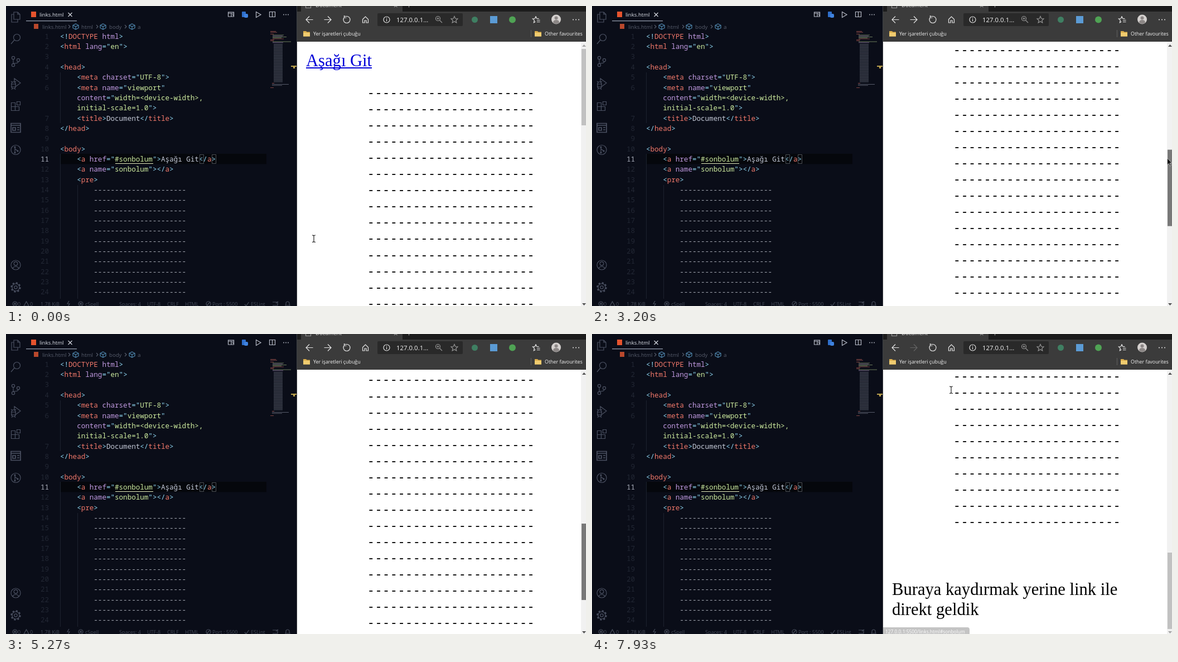
These frames come from a looping animation (1040 px wide and 538 px high, 8000 ms). An HTML page:

```html
<!DOCTYPE html>
<html lang="tr">
<head>
<meta charset="UTF-8">
<title>Links</title>
<style>
html, body { margin: 0; width: 100%; height: 100%; overflow: hidden; background: #0a0d18 }
svg { display: block; width: 1040px; height: 538px }
text { white-space: pre }
.code { font: 12.57px "Noto Sans Mono", monospace }
.ui { font-family: "Open Sans", sans-serif }
.page { font: 30.6px "Liberation Serif", serif }
.dash { font: 22.7px "DejaVu Sans Mono", monospace }
.line { fill: none; stroke-width: 1.2 }
</style>
</head>
<body>
<svg id="stage" viewBox="0 0 1040 538"></svg>
<script>
const LOOP = 8000, FPS = 15, ROWS = 45, MAX_SCROLL = 1097, TRACK = 315;
const esc = s => s.replace(/&/g, '&amp;').replace(/</g, '&lt;');
const text = (cls, x, y, fill, s, size, anchor = 'start') =>
  `<text class="${cls}" x="${x}" y="${y}" fill="${fill}" text-anchor="${anchor}"${size ? ` style="font-size:${size}px"` : ''}>${s}</text>`;
const rect = (x, y, w, h, fill, more = '') => `<rect x="${x}" y="${y}" width="${w}" height="${h}" fill="${fill}" ${more}/>`;
const line = (d, stroke, more = '') => `<path class="line" d="${d}" stroke="${stroke}" ${more}/>`;
const disc = (x, y, r, fill) => `<circle cx="${x}" cy="${y}" r="${r}" fill="${fill}"/>`;
const ring = (x, y, r, stroke, more = '') => `<circle class="line" cx="${x}" cy="${y}" r="${r}" stroke="${stroke}" ${more}/>`;
const repeat = (n, f) => Array.from({ length: n }, (_, i) => f(i)).join('');

// Editor
const COL = 7.54, ROW = 18.34;
const SYNTAX = /((?<==")[^"]+|^initial[^"]+)|(<[\/!]?|>|=|")|((?<=<[\/!]?)\w+)|(\w+(?==")|html(?=>))/g;
const COLORS = ['#cdeb9f', '#8fd6f2', '#f0786a', '#c09ae0'];
const paint = s => s.replace(SYNTAX, (m, ...g) => `<tspan fill="${COLORS[g.findIndex(Boolean)]}">${esc(m)}</tspan>`);
const HYPHENS = '-'.repeat(22);
const code = [
  [1, 0, '<!DOCTYPE html>'], [2, 0, '<html lang="en">'], [3, 0, ''], [4, 0, '<head>'],
  [5, 4, '<meta charset="UTF-8">'], [6, 4, '<meta name="viewport"'],
  ['', 4, 'content="width=<device-width>,'], ['', 4, 'initial-scale=1.0">'],
  [7, 4, '<title>Document</title>'], [8, 0, '</head>'], [9, 0, ''], [10, 0, '<body>'],
  [11, 4, '<a href="#sonbolum">Aşağı Git</a>'], [12, 4, '<a name="sonbolum"></a>'], [13, 4, '<pre>'],
  ...Array.from({ length: 11 }, (_, i) => [14 + i, 8, HYPHENS])
];

function codeLines() {
  return rect(97, 265, 370, 18.5, '#05070c') +
    line('M97.5 119V210M97.5 265V525M128.5 321V525', '#1c212d', 'stroke-width="1"') +
    code.map(([n, col, s], i) => {
      const y = 58.8 + ROW * i;
      return text('code', 77, y, n == 11 ? '#a9adba' : '#222734', n, 0, 'end') +
        text('code', 97 + COL * col, y, s == HYPHENS ? '#a9adb8' : '#c3c8d6', paint(s));
    }).join('') +
    line('M196 282.5H264', '#e4ecc0') +
    line('M347.5 266.5h7v16h-7zM369.5 266.5h7v16h-7z', '#4c5055', 'style="stroke-width:1"');
}

function minimap() {
  const rows = [[0, 10, 2], [0, 12, 2], [0, 6, 2], [4, 20, 0], [4, 18, 3], [4, 25, 0], [4, 16, 0], [4, 20, 2], [0, 7, 2], [0, 6, 2], [4, 33, 0], [4, 19, 3]];
  return rows.map(([x, w, c], i) => rect(474 + x, 45 + i * 1.7 + (i > 1) * 1.5, w, 1, COLORS[c], 'opacity=".5"')).join('') +
    repeat(ROWS, i => rect(480, 68 + i * 1.54, 16, .8, '#737986', 'opacity=".6"')) +
    rect(477, 138, 4, 1, COLORS[2], 'opacity=".5"') + rect(477, 140, 30, 1, '#8b90a0', 'opacity=".6"') +
    rect(477, 142, 18, 1, '#8b90a0', 'opacity=".5"') + rect(474, 146, 6, 1, COLORS[2], 'opacity=".5"') +
    rect(511, 107, 10, 2, '#bda34e') + rect(515, 109, 3, 3, '#bda34e');
}

const cube = (x, y) => line(`M${x} ${y - 5}l5 2.5v5l-5 2.5l-5-2.5v-5zM${x - 5} ${y - 2.5}l5 2.5l5-2.5M${x} ${y}v5`, '#4f86ad');

function editorChrome() {
  const dim = '#4b5162', soft = '#b6bac5', crumb = '#565c6b', low = '#454b59';
  const ui = (x, y, fill, s, size) => text('ui', x, y, fill, s, size);
  const status = [[21, '0'], [43, '0'], [62, '1.78 KiB'], [142, 'cSpell'], [203, 'Spaces: 4'], [253, 'UTF-8'], [289, 'CRLF'], [321, 'HTML'], [370, 'Port : 5500'], [439, 'ESLint']];
  return rect(45, 10, 9, 10, '#e5532d') + ui(60, 19, '#dfe2ea', 'links.html', 9.6) +
    line('M111.5 12l7 7m0-7l-7 7', '#d5d8e0') + rect(36, 26, 91, 1.3, '#8f98a8') +
    rect(50, 32, 8, 9, '#b9482c') + ui(65, 41, crumb, 'links.html', 9.6) +
    ui(135, 41, crumb, 'html', 9.8) + ui(185, 41, crumb, 'body', 9.6) + ui(236, 41, crumb, 'a', 9.8) +
    cube(125, 37) + cube(174, 37) + cube(226, 37) +
    [112, 162, 213].map(x => line(`M${x} 34l3 3l-3 3`, crumb)).join('') +
    // toolbar
    line('M398.5 11h10v8h-10zM398.5 13h10M404 13v6M406 15l3 3', soft) +
    rect(423, 10, 7, 10, '#2f6fca', 'rx="1"') + rect(427, 14, 7, 7, '#3f82df', 'rx="2"') +
    line('M448.5 10.5v10l8.5-5z', soft) + line('M472.5 10.5h10v9h-10zM477.5 10.5v9', soft) +
    [498, 502, 506].map(x => disc(x, 15.5, .9, soft)).join('') +
    // activity bar
    line('M14 11h7l4 4v9h-11zM14 15h-4v14h11v-5M21 11v4h4', dim) +
    ring(19.5, 56.5, 6, dim) + line('M15 61l-6 7', dim) +
    ring(13, 93, 2.6, dim) + ring(13, 106, 2.6, dim) + ring(22, 97, 2.6, dim) + line('M13 96v7.5M22 100q0 3-9 3', dim) +
    line('M15 136v-6l11 8l-8 6M9 140h9M9 145h9M9 135l3 2M18 135l-3 2M10 150l2-3M17 150l-2-3M10 140q0-4 3.5-4t3.5 4v4q0 4-3.5 4t-3.5-4z', dim) +
    line('M9.5 173.5h7v14h-7zM9.5 180.5h14v7h-14M19.5 171.5h6v6h-6z', dim) +
    line('M9 210.5h17v16h-17zM9 214h17M12 218h5v5h-5zM20 218h4M20 222h4', dim, 'style="stroke-width:1.7"') +
    ring(17.5, 258, 8.5, dim) + line('M16 252v12M16 256l5 4', dim) + disc(16, 253, 1.6, dim) + disc(16, 263, 1.6, dim) + disc(21, 260, 1.6, dim) +
    ring(17.5, 464.5, 8.5, dim) + ring(17.5, 462, 3.3, dim) + line('M11.5 470.5q6-7 12 0', dim) +
    ring(17.5, 504.5, 2.7, dim) + ring(17.5, 504.5, 8, dim, 'style="stroke-width:2.4" stroke-dasharray="3.14"') + ring(17.5, 504.5, 6.5, dim) +
    // status bar
    status.map(([x, s]) => ui(x, 537.5, low, s, 9)).join('') +
    [16, 134, 363].map(x => ring(x, 534, 4, low)).join('') +
    line('M14 532l4 4m0-4l-4 4M32 538l4.5-8l4.5 8zM132 532l4 4m0-4l-4 4M360 537l6-6M428 535l2.5 3l5-7M113 529l-3 5h4l-3 5M478 531h9v6h-9M484 533l4-3M501 537h8l-1-2v-3q-3-4-6 0v3z', low);
}

// Browser
function browserChrome() {
  const c = '#e4e4e4', g = '#959595';
  const folder = x => `<path d="M${x} 45h5l1.5 1.5h5.5v8h-12z" fill="#dcae4b"/>` + rect(x, 48, 12, 6.5, '#f0cc70');
  return rect(522, 0, 518, 64, '#3b3b3b') + rect(711, 0, 329, 10, '#1c1c1c') + rect(522, 0, 7, 10, '#1c1c1c') +
    line('M537.5 0v3.5h9v-3.5M696 2l2.5-2.5l3 2.5M722.5 0v2.5', g) + text('ui', 555, 2, c, 'Document', 9.6) +
    line('M550.5 24.5h-12M544 18.5l-6 6l6 6', c) +
    `<g id="forward">${line('M570.5 24.5h12M577 18.5l6 6l-6 6', c)}</g>` +
    line('M606.5 20.5a6 6 0 1 0 4-2h-4M606.5 17v4h4', c) +
    line('M639.5 24l5-5l5 5v6h-3.5v-4h-3v4h-3.5z', c) +
    rect(666, 13, 153, 23, '#292929', 'rx="2"') + ring(682.5, 24.5, 5.5, c) + line('M682.5 23.5v4M682.5 21v1.2', c) +
    text('ui', 700, 28.5, '#f2f2f2', '127.0.0.1...', 11.4) +
    ring(774.5, 22.5, 4, g) + line('M777.5 25.5l4.5 4.5M772.5 22.5h4M774.5 20.5v4', g) +
    line('M804 18.5l1.8 4l4.2.4l-3.2 2.9l1 4.2l-3.8-2.2l-3.8 2.2l1-4.2l-3.2-2.9l4.2-.4z', g) +
    disc(840.5, 24.5, 5.5, '#3f7f62') + rect(868, 18, 13, 13, '#5b9bd5') + disc(908, 24.5, 6, '#4fa354') +
    line('M950 18.5l1.6 4l4 .2M950 18.5l-1.6 4l-4 .4l3 2.7l-1 4.2l3-1.8M952 25.5h5.5M952 28.5h5.5', c) +
    disc(986.5, 24, 8.5, '#d4d0ce') + disc(986.5, 21.5, 3, '#8b8685') + '<path d="M981 30q0-5 5.5-5t5.5 5q-5.5 4-11 0" fill="#8b8685"/>' +
    [1017, 1022, 1027].map(x => disc(x, 24.5, 1, c)).join('') +
    folder(533) + text('ui', 551, 53, '#f0f0f0', 'Yer işaretleri çubuğu', 8.9) +
    rect(941, 43, 1, 13, '#606060') + folder(948) + text('ui', 966, 53, '#f0f0f0', 'Other favourites', 8.9);
}

function pageBody() {
  const blue = '#0000d8';
  return text('page', 538, 108, blue, 'Aşağı Git') + rect(538, 110, 118, 2, blue) +
    repeat(ROWS, i => text('dash', 647.5, 163 + 29.05 * i, '#000', HYPHENS)) +
    text('page', 538, 1564.5, '#000', 'Buraya kaydırmak yerine link ile') + text('page', 538, 1600.5, '#000', 'direkt geldik');
}

const stage = document.getElementById('stage');
stage.innerHTML = rect(0, 0, 522, 538, '#0a0d18') + codeLines() + minimap() + editorChrome() +
  rect(521, 0, 1, 538, '#3c3e44') +
  rect(522, 64, 518, 474, '#fff') + `<g id="page">${pageBody()}</g>` +
  rect(1031, 64, 9, 474, '#f1f1f1') + '<path id="up" d="M1033 73l3.5-4l3.5 4z"/><path id="down" d="M1033 533l3.5 4l3.5-4z"/>' +
  rect(1032, 77, 8, 137, '#c1c1c1', 'id="thumb"') + browserChrome() +
  `<g id="bubble"><path d="M522 526h151q4 0 4 4v8h-155z" fill="#3b3b3b"/>${text('ui', 526, 537, '#fff', '127.0.0.1:5500/links.html#sonbolum', 8.4)}</g>
  <path id="arrow" d="M0 0v12l2.8-2.6l1.9 4.4l2-.9l-1.9-4.2h3.7z" fill="#111" stroke="#fff" stroke-width=".6"/>
  <path id="beam" class="line" d="M-3-6q3 0 3 1.5q0-1.5 3-1.5M0-5v11M-3 6.5q3 0 3-1.5q0 1.5 3 1.5" stroke="#222"/>
  <path id="hand" d="M-1.5 0q1.5-1.5 2.5 0v5l5 1.2q1.5.4 1.3 2l-1 5.8h-6l-4.5-5.5q1-1.5 2.7.5z" fill="#fff" stroke="#111"/>`;

const part = Object.fromEntries([...stage.querySelectorAll('[id]')].map(e => [e.id, e]));
const set = (id, name, value) => part[id].setAttribute(name, value);

// Keys are [time, value], joined by straight segments.
function track(keys, t) {
  const i = keys.findIndex(k => k[0] > t);
  if (i < 0) return keys[keys.length - 1][1];
  if (!i) return keys[0][1];
  const [t0, a] = keys[i - 1], [t1, b] = keys[i];
  return a + (b - a) * (t - t0) / (t1 - t0);
}
const SCROLL = [[2130, 0], [2600, 249.5], [3800, 1009], [4300, MAX_SCROLL], [5000, MAX_SCROLL], [5270, 916], [5650, 190], [5800, 0]];
const MOUSE_X = [[330, 552], [700, 770], [1130, 1037], [1800, 1037.5], [2130, 1034], [2600, 1032], [3800, 1031], [5000, 1032], [5070, 1043], [6270, 1043], [6600, 820], [6930, 653], [7070, 651], [7400, 644]];
const MOUSE_Y = [[330, 417], [700, 270], [1130, 90], [1530, 88], [1930, 88], [2130, 92], [2600, 165], [3800, 381], [4500, 408], [5000, 408], [5800, 100], [7930, 100]];
const JUMP = 7600, HOVER = 6930;

const step = ms => Math.round(Math.floor(ms * FPS / 1000 + .06) * 100 / FPS) * 10;

function draw(now) {
  const t = step(now % LOOP), jumped = t >= JUMP;
  const scroll = jumped ? MAX_SCROLL : track(SCROLL, t);
  const x = track(MOUSE_X, t), y = track(MOUSE_Y, t);
  set('page', 'transform', `translate(0 ${-scroll})`);
  set('thumb', 'y', 77 + scroll / MAX_SCROLL * TRACK);
  set('thumb', 'fill', t >= 1930 && t < 6270 ? '#787878' : t >= 1800 && t < 1930 ? '#a8a8a8' : '#c1c1c1');
  set('up', 'fill', scroll > 0 ? '#505050' : '#a3a3a3');
  set('down', 'fill', scroll < MAX_SCROLL ? '#505050' : '#a3a3a3');
  set('forward', 'opacity', jumped ? .25 : 1);
  set('bubble', 'opacity', track([[7060, 0], [7200, 1], [7810, 1], [7980, 0]], t));
  const shown = x > 1030 ? 'arrow' : t >= HOVER && !jumped ? 'hand' : 'beam';
  for (const id of ['arrow', 'beam', 'hand']) {
    set(id, 'visibility', id == shown ? 'visible' : 'hidden');
    set(id, 'transform', `translate(${x} ${y})`);
  }
  requestAnimationFrame(draw);
}
requestAnimationFrame(draw);
</script>
</body>
</html>
```
